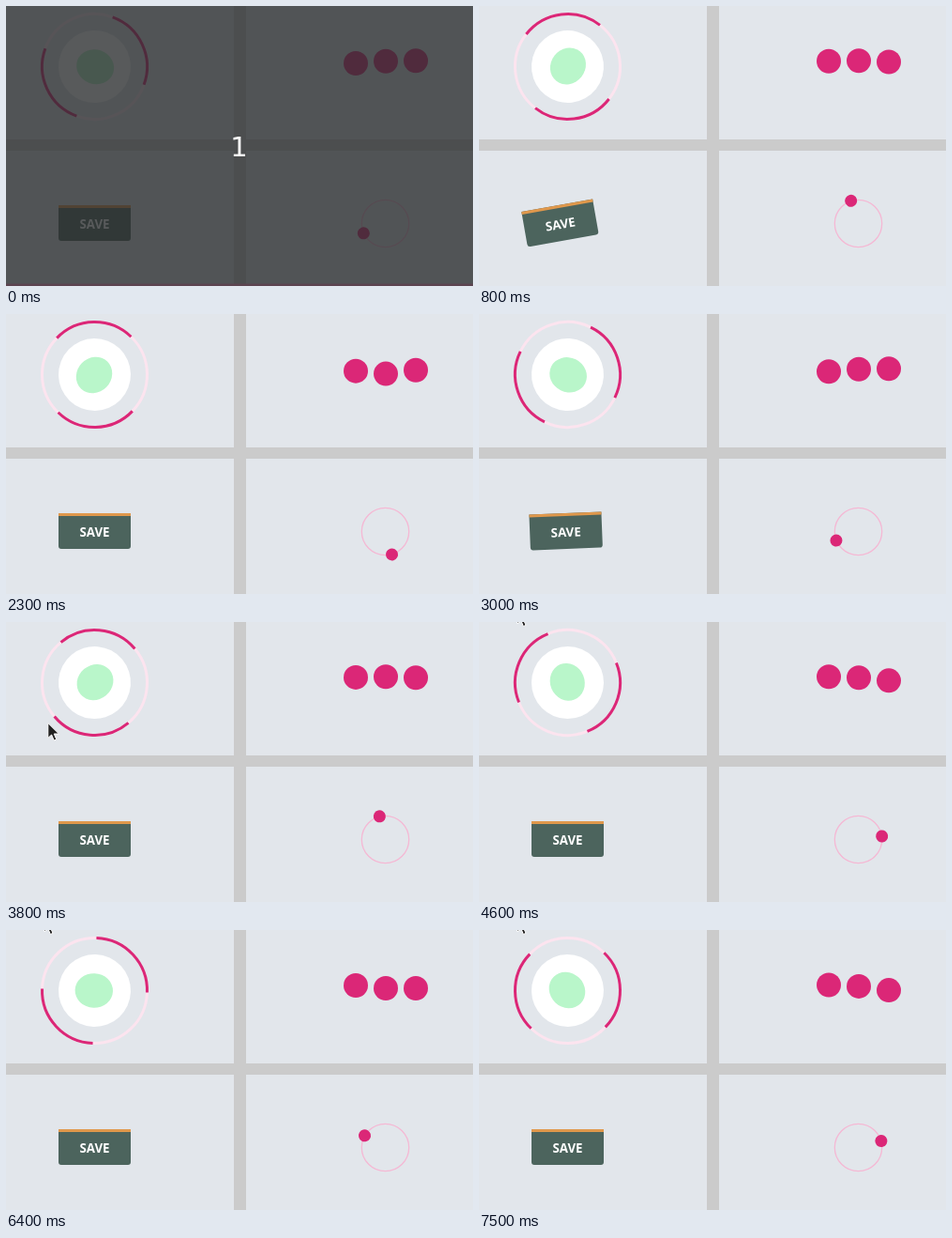
An HTML page that plays this animation: 498x298 px, repeating every 7.7 s.

```html
<!DOCTYPE html>
<html lang="en">
<head>
<meta charset="utf-8">
<title>Loaders</title>
<style>
  html, body { margin: 0; width: 100%; height: 100%; overflow: hidden; background: #e2e6eb; }
  svg { display: block; width: 498px; height: 298px; }
  .pink { fill: #db2777; }
  .label { font: 700 13.33px "Open Sans", "Noto Sans", sans-serif; fill: #fff; text-anchor: middle; }
  .count { font: 29px "DejaVu Sans", sans-serif; fill: #fff; text-anchor: middle; }
</style>
</head>
<body>
<svg viewBox="0 0 498 298">
  <rect width="498" height="298" fill="#e2e6eb"/>
  <path d="M243 0h13v298h-13zM0 142h498v12H0z" fill="#cbcbcb"/>

  <g id="spinner">
    <circle r="56" fill="none" stroke="#fce4ef" stroke-width="3"/>
    <circle r="56" fill="none" stroke="#db2777" stroke-width="3"
      pathLength="4" stroke-dasharray="1 1" stroke-dashoffset="1"/>
    <circle r="38.5" fill="#fff"/>
    <ellipse cx=".7" rx="20.2" ry="18.3" fill="#b9f6ca"/>
  </g>

  <g id="dots" class="pink">
    <circle cx="373" r="13"/>
    <circle cx="405" r="13"/>
    <circle cx="437" r="13"/>
  </g>

  <g id="button">
    <path d="M-38.5 -19h77v35a3 3 0 0 1 -3 3h-71a3 3 0 0 1 -3 -3z" fill="#4c645d"/>
    <path d="M-38.5 -19h77v3h-77z" fill="#e0984c"/>
    <text class="label" y="6">SAVE</text>
  </g>

  <g transform="translate(404.5 231.5)">
    <circle r="25.2" fill="none" stroke="#f5b8d4" stroke-width="1.3"/>
    <circle id="planet" class="pink" cx="25.4" r="6.5"/>
  </g>

  <path id="pointer" d="M0 0v16l3.8 -3.5 2.6 6 2.6 -1.1 -2.6 -5.9h5.2z"
    fill="#222" stroke="#fff" stroke-width="1"/>

  <g id="countdown">
    <rect width="498" height="298" fill="#2a2c2e" fill-opacity=".78"/>
    <rect y="295.5" width="498" height="2.5" fill="#5c4450"/>
    <text class="count" x="248.5" y="160">1</text>
  </g>
</svg>
<script>
const LOOP = 7700, STEP = 100, LAST = 7500;
const $ = id => document.getElementById(id);
const dots = [...$("dots").children];
const show = (el, on) => el.setAttribute("visibility", on ? "visible" : "hidden");
const move = (el, x, y, angle = 0) =>
  el.setAttribute("transform", `translate(${x} ${y}) rotate(${angle})`);

// Linear interpolation through [time, value] pairs
function track(keys, t) {
  if (t <= keys[0][0]) return keys[0][1];
  for (let i = 1; i < keys.length; i++) {
    const [t0, a] = keys[i - 1], [t1, b] = keys[i];
    if (t < t1) return a + (b - a) * (t - t0) / (t1 - t0);
  }
  return keys[keys.length - 1][1];
}

const wobble = [[0.7, 0], [0.85, -15], [1.125, 6], [1.25, 0]];

// One bounce per second, sharpest at its lowest point
function bounceY(phase) {
  const p = ((phase % 1) + 1) % 1;
  return 58.3 + 6.3 * Math.pow(1 - Math.abs(p - 0.55) / 0.55, 2.5 * 1.08);
}

function render(ms) {
  const t = Math.min(Math.floor(ms / STEP) * STEP, LAST) / 1000;
  // The loaders run slightly fast, slipping by whole 60 Hz refreshes
  const clock = t + Math.floor(0.51 * t + 0.24) / 60;

  move($("spinner"), 94.5, 64.5, 20 + clock * 360);
  dots.forEach((dot, i) => dot.setAttribute("cy", bounceY(clock + 0.4 - i * 0.2)));
  $("planet").setAttribute("transform", `rotate(${156 + clock * 120})`);

  const tilt = track(wobble, clock % 2);
  move($("button"), 94.5 + tilt * 0.8, 231, tilt);

  const k = Math.min(Math.max((t - 3.7) / 0.4, 0), 1);
  const left = (1 - k) ** 3;
  move($("pointer"), 41 + 9 * left, -14 + 288 * left);
  show($("pointer"), t >= 3.7);
  show($("countdown"), t < 0.1);
}

const start = performance.now();
function tick() {
  render((performance.now() - start) % LOOP);
  requestAnimationFrame(tick);
}
tick();
</script>
</body>
</html>
```
